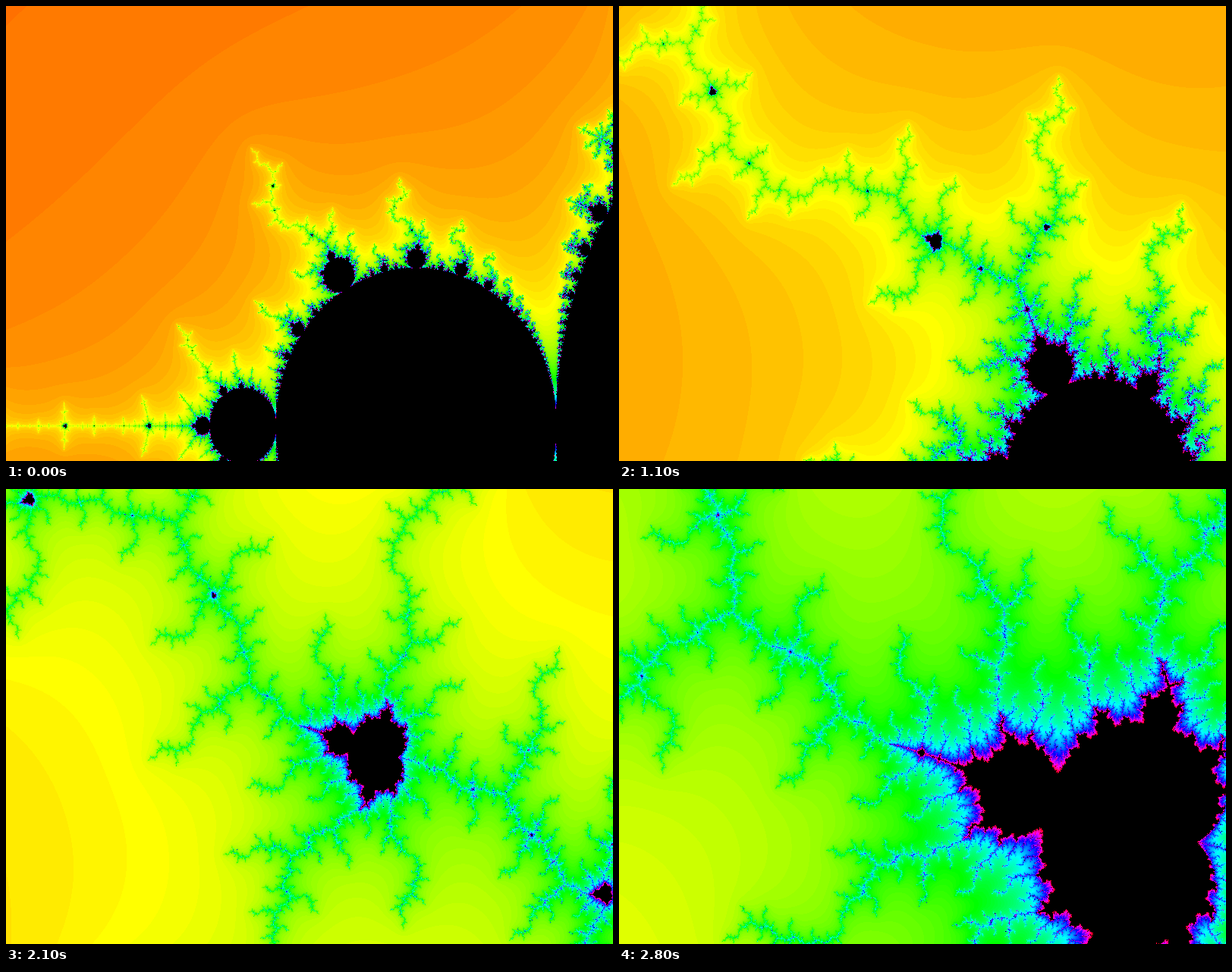
An HTML page with a canvas that plays this animation: 800x600 px, repeating every 2900 ms.

```html
<!DOCTYPE html>
<html lang="en">
<head>
<meta charset="utf-8">
<title>Mandelbrot zoom</title>
<style>
  html, body { margin: 0; width: 100%; height: 100%; overflow: hidden; background: #000; }
  canvas { display: block; }
</style>
</head>
<body>
<canvas width="800" height="600"></canvas>
<script>
const W = 800, H = 600, STEP = 100, STEPS = 29;
const CENTER = { re: -1.19, im: 0.305 };
const START_WIDTH = 1.5 * 0.85 ** 2, ZOOM = 0.85, ASPECT = 2 / 3;
const MAX_ITER = 150;
const ctx = document.querySelector('canvas').getContext('2d');

const channel = (hue, shift) =>
  Math.round(255 * Math.min(1, Math.max(0, Math.abs((hue * 6 + shift) % 6 - 3) - 1)));

// Hue runs once round the wheel with the escape time; points that stay are black.
const palette = Uint32Array.from({ length: MAX_ITER + 1 }, (_, n) => {
  if (n === MAX_ITER) return 0xff000000;
  const hue = n / MAX_ITER;
  return 0xff000000 | channel(hue, 2) << 16 | channel(hue, 4) << 8 | channel(hue, 0);
});

// Counts steps until the squared modulus overflows.
function escapeTime(a, b) {
  const q = (a - 0.25) ** 2 + b * b;
  if (q * (q + a - 0.25) < b * b / 4 || (a + 1) ** 2 + b * b < 0.0625) return MAX_ITER;
  let x = 0, y = 0;
  for (let n = 0; n < MAX_ITER; n++) {
    const xx = x * x, yy = y * y;
    if (xx + yy === Infinity) return n;
    y = 2 * x * y + b;
    x = xx - yy + a;
  }
  return MAX_ITER;
}

const cache = [];
function render(step) {
  if (cache[step]) return cache[step];
  const image = new ImageData(W, H), pixels = new Uint32Array(image.data.buffer);
  const width = START_WIDTH * ZOOM ** step, height = width * ASPECT;
  for (let py = 0, i = 0; py < H; py++) {
    const im = CENTER.im - (py / H - 0.5) * height;
    for (let px = 0; px < W; px++) {
      pixels[i++] = palette[escapeTime(CENTER.re + (px / W - 0.5) * width, im)];
    }
  }
  return cache[step] = image;
}

let shown = -1;
function draw(now) {
  const step = Math.floor(now / STEP) % STEPS;
  if (step !== shown) ctx.putImageData(render(step), 0, 0);
  else render((step + 1) % STEPS);
  shown = step;
  requestAnimationFrame(draw);
}
draw(performance.now());
</script>
</body>
</html>
```
